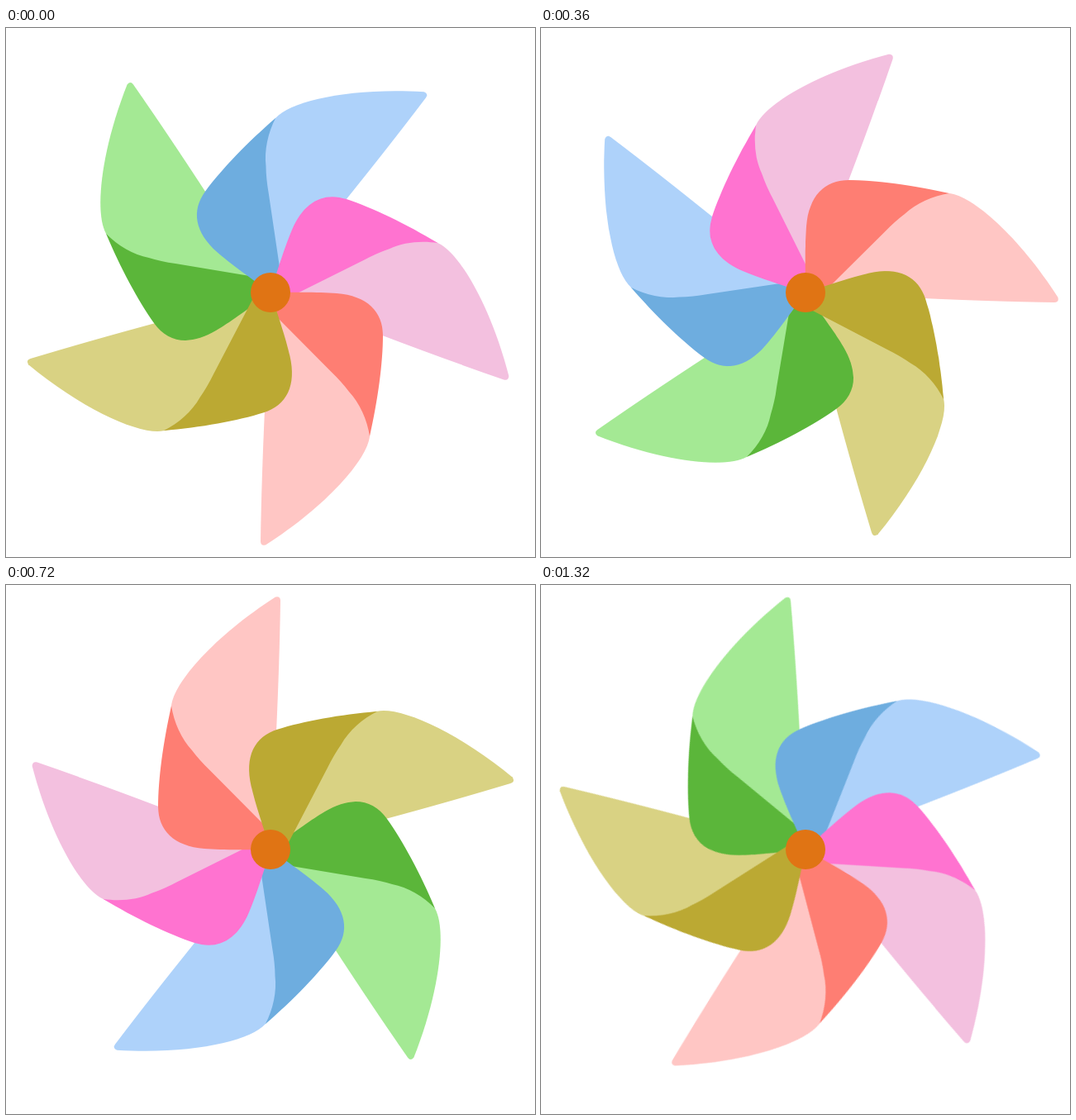
Write an HTML page that moves like this. It is 640 px wide and 640 px high and loops after 1.44 s.

```html
<!DOCTYPE html>
<html lang="en">
<head>
<meta charset="utf-8">
<title>Pinwheel</title>
<style>
  html, body { margin: 0; width: 100%; height: 100%; overflow: hidden; background: #fff; }
  svg { display: block; width: 100%; height: 100%; }
  .wheel {
    transform-origin: 320px 320px;
    animation: spin 1440ms steps(12, end) infinite;
  }
  @keyframes spin { to { transform: rotate(-360deg); } }
</style>
</head>
<body>
<svg viewBox="0 0 640 640">
  <defs>
    <path id="sail" d="M200 146C203 118 252 62 326 14.5Q332 13 332 19Q331 90 327 178L320 320L200 200Z"/>
    <path id="fold" d="M200 146C190 190 184 235 184 268C184 297 203 316 240 319C258 320.5 280 320.5 320 320L320 298L309 287L247 224.5Q234 212 225 200C212 186 203 166 200 146Z"/>
  </defs>
  <g class="wheel">
    <!-- every fold lies above the neighbouring sail -->
    <use href="#sail" fill="#a4e994" transform="rotate(324.3 320 320)"/>
    <use href="#sail" fill="#aed2fa" transform="rotate(36.3 320 320)"/>
    <use href="#sail" fill="#f3c0df" transform="rotate(108.2 320 320)"/>
    <use href="#sail" fill="#ffc6c4" transform="rotate(180 320 320)"/>
    <use href="#sail" fill="#d9d283" transform="rotate(252.3 320 320)"/>
    <use href="#fold" fill="#5bb63a" transform="rotate(324.3 320 320)"/>
    <use href="#fold" fill="#6eaddf" transform="rotate(36.3 320 320)"/>
    <use href="#fold" fill="#ff73d0" transform="rotate(108.2 320 320)"/>
    <use href="#fold" fill="#fe7e73" transform="rotate(180 320 320)"/>
    <use href="#fold" fill="#bba933" transform="rotate(252.3 320 320)"/>
  </g>
  <circle cx="320" cy="320" r="24" fill="#e07414"/>
</svg>
</body>
</html>
```
